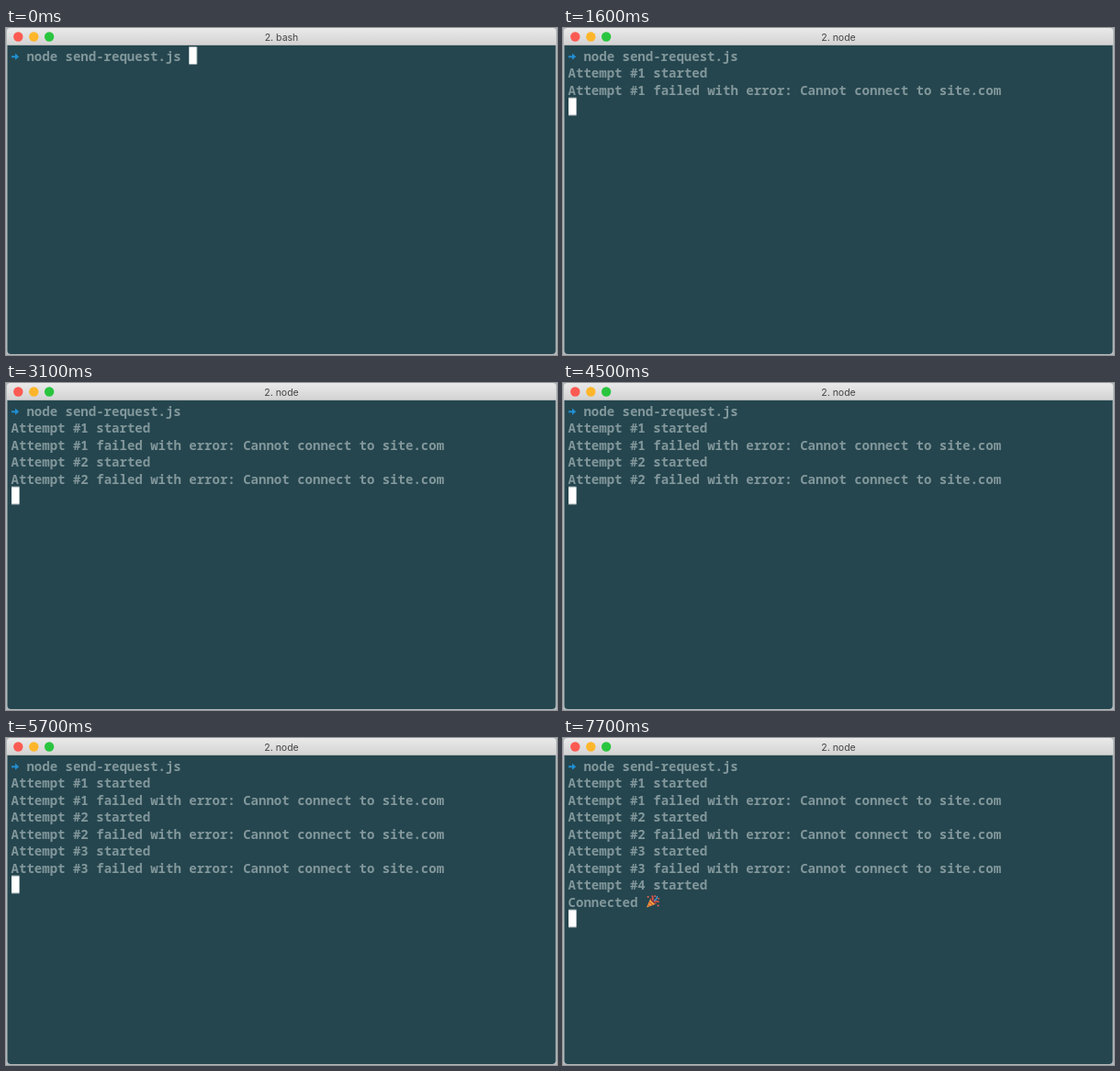
Animation of 600 by 356 pixels, one loop 8100 ms. Source, as an HTML page:

```html
<!DOCTYPE html>
<html lang="en">
<head>
<meta charset="utf-8">
<title>Terminal: retrying a request</title>
<style>
  html, body { margin: 0; width: 100%; height: 100%; overflow: hidden; background: #b3b8ba; }
  svg { display: block; width: 600px; height: 356px; }
  .term { font: 600 14px "Noto Sans Mono", "DejaVu Sans Mono", monospace; letter-spacing: .02px; fill: #82979b; }
  .title { font: 400 10.5px Inter, "Open Sans", sans-serif; fill: #444; text-anchor: middle; }

  /* One 8.1 s loop, hard changes only */
  .bash, .node, .try, .done, .cursor { animation: 8.1s step-end infinite; }
  .bash { animation-name: leave; }
  .node, .try1 { animation-name: first; }
  .try2 { animation-name: second; }
  .try3 { animation-name: third; }
  .try4 { animation-name: fourth; }
  .done { animation-name: connect; }
  .cursor { animation-name: cursor; }

  @keyframes leave   { 0% { opacity: 1 } 19.753%, 100% { opacity: 0 } }
  @keyframes first   { 0% { opacity: 0 } 19.753%, 100% { opacity: 1 } }
  @keyframes second  { 0% { opacity: 0 } 38.271%, 100% { opacity: 1 } }
  @keyframes third   { 0% { opacity: 0 } 56.790%, 100% { opacity: 1 } }
  @keyframes fourth  { 0% { opacity: 0 } 75.308%, 100% { opacity: 1 } }
  @keyframes connect { 0% { opacity: 0 } 81.481%, 100% { opacity: 1 } }
  @keyframes cursor {
    0%            { transform: translate(193.3px, 0) }
    7.407%        { transform: translate(0, 18.5px) }
    19.753%       { transform: translate(0, 55.5px) }
    38.271%       { transform: translate(0, 92.5px) }
    56.790%       { transform: translate(0, 129.5px) }
    75.308%       { transform: translate(0, 148px) }
    81.481%, 100% { transform: translate(0, 166.5px) }
  }
</style>
</head>
<body>
<svg viewBox="0 0 600 356">
  <defs>
    <linearGradient id="bar" x2="0" y2="1">
      <stop stop-color="#ebeaeb"/>
      <stop offset="1" stop-color="#d3d2d3"/>
    </linearGradient>
  </defs>

  <!-- window -->
  <path d="M1.5 10H598.5V351a4 4 0 0 1-4 4H5.5a4 4 0 0 1-4-4Z" fill="#25464f"/>
  <path d="M1 19V4a4 4 0 0 1 4-4H595a4 4 0 0 1 4 4V19Z" fill="url(#bar)"/>
  <path d="M1 18.5H599" stroke="#b5b6b7"/>
  <circle cx="13.3" cy="9.5" r="5.2" fill="#fc5b53"/>
  <circle cx="30.3" cy="9.5" r="5.2" fill="#fdb62b"/>
  <circle cx="47.1" cy="9.5" r="5.2" fill="#2ac53f"/>
  <g class="title">
    <text class="bash" x="300" y="13.5">2. bash</text>
    <text class="node" x="300" y="13.5">2. node</text>
  </g>

  <!-- prompt arrow -->
  <path d="M6 30.2H10V27.6L14.2 31.2L10 34.8V32.3H6Z" fill="#218fd2"/>

  <g class="term">
    <text x="22.4" y="35.5">node send-request.js</text>
    <g class="try try1">
      <text x="5.6" y="54">Attempt #1 started</text>
      <text x="5.6" y="72.5">Attempt #1 failed with error: Cannot connect to site.com</text>
    </g>
    <g class="try try2">
      <text x="5.6" y="91">Attempt #2 started</text>
      <text x="5.6" y="109.5">Attempt #2 failed with error: Cannot connect to site.com</text>
    </g>
    <g class="try try3">
      <text x="5.6" y="128">Attempt #3 started</text>
      <text x="5.6" y="146.5">Attempt #3 failed with error: Cannot connect to site.com</text>
    </g>
    <text class="try try4" x="5.6" y="165">Attempt #4 started</text>
    <g class="done">
      <text x="5.6" y="183.5">Connected</text>
      <!-- party popper -->
      <path d="M91 184.6L95.3 174.5Q99.5 176 101.6 180.6Z" fill="#f0a63c"/>
      <path d="M93.6 178.5L97.6 182M92.4 181.4L94.6 183.2" stroke="#d9503f" stroke-width="1.2"/>
      <ellipse cx="98.4" cy="177.4" rx="4.2" ry="1.6" transform="rotate(45 98.4 177.4)" fill="#7c3340"/>
      <path d="M97.5 176.5Q98.8 174 96.8 171.5M99.5 178.6Q102 177 104.6 178.6" fill="none" stroke="#e2574c" stroke-width="1.5"/>
      <path d="M98.8 177.2Q102.4 176 102.6 172" fill="none" stroke="#4b9fd8" stroke-width="1.3"/>
      <g fill="#ee6352">
        <circle cx="92.6" cy="173" r="1"/>
        <circle cx="100.2" cy="172.2" r=".9"/>
        <circle cx="104" cy="174.8" r=".9"/>
        <circle cx="103.6" cy="182.4" r="1"/>
      </g>
    </g>
  </g>

  <rect class="cursor" x="6" y="20.5" width="8.6" height="19" fill="#fff"/>
</svg>
</body>
</html>
```
